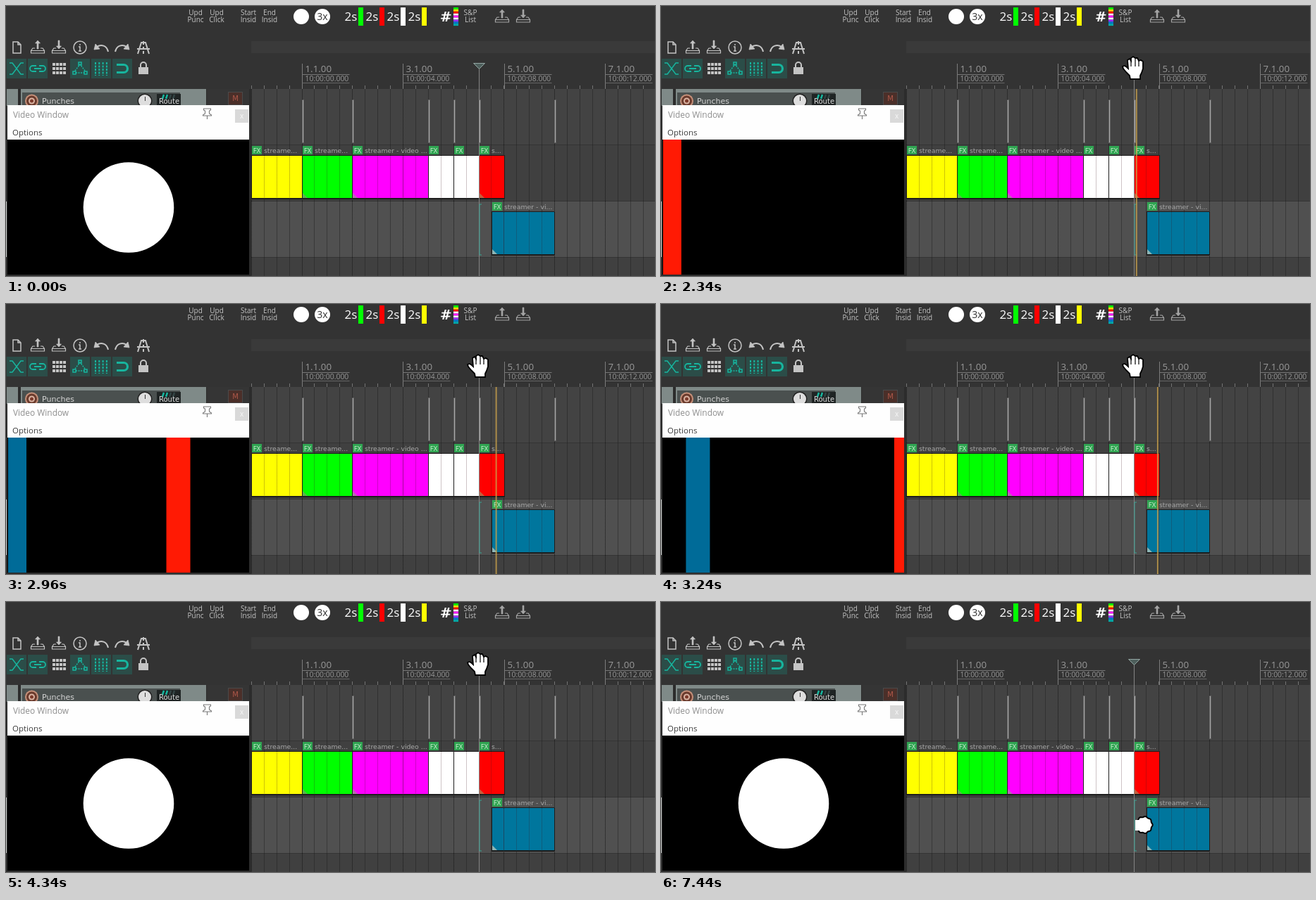
Write an HTML page with a canvas that moves like this. It is 921 px wide and 384 px high and loops after 8 s.

```html
<!DOCTYPE html>
<html lang="en">
<head>
<meta charset="utf-8">
<style>
html, body { margin: 0; width: 100%; height: 100%; overflow: hidden; background: #333; }
canvas { display: block; }
</style>
</head>
<body>
<canvas id="stage" width="921" height="384"></canvas>
<script>
const LOOP = 8000, STEP = 69, PLAY = 2270, STOP = 4340;
const BEAT = 17.93, BAR_X = 420.5, EDIT_X = 671.5;
const SANS = '"Open Sans", sans-serif', WIDE = '"DejaVu Sans", sans-serif';
const TEAL = '#17b59e', PALE = '#c4c4c4';
const stage = document.getElementById('stage');
const still = document.createElement('canvas');
still.width = 921;
still.height = 384;
let c = still.getContext('2d');

function rect(x, y, w, h, color) {
  c.fillStyle = color;
  c.fillRect(x, y, w, h);
}

function disc(x, y, r, color) {
  c.fillStyle = color;
  c.beginPath();
  c.arc(x, y, r, 0, 7);
  c.fill();
}

function text(s, x, y, size, color, font = SANS, align = 'left') {
  c.font = size + 'px ' + font;
  c.fillStyle = color;
  c.textAlign = align;
  c.fillText(s, x, y);
}

function line(x1, y1, x2, y2, color, dash = [], width = 1) {
  c.strokeStyle = color;
  c.lineWidth = width;
  c.setLineDash(dash);
  c.beginPath();
  c.moveTo(x1, y1);
  c.lineTo(x2, y2);
  c.stroke();
  c.setLineDash([]);
}

// Strokes (and optionally fills) an SVG path placed at x, y.
function icon(d, x, y, color, width = 1.5, fill) {
  const path = new Path2D(d);
  c.save();
  c.translate(x, y);
  if (fill) {
    c.fillStyle = fill;
    c.fill(path);
  }
  c.strokeStyle = color;
  c.lineWidth = width;
  c.stroke(path);
  c.restore();
}

function drive(x, y, up, color) {
  icon('M-4 2H-7L-9.5 5.5V9H9.5V5.5L7 2H4M-9.5 5.5H9.5', x, y, color, 1.2);
  icon(up ? 'M0 -9L3.5 -5H1V3H-1V-5H-3.5Z' : 'M0 3L3.5 -1H1V-9H-1V-1H-3.5Z', x, y, color, .6, color);
}

// side is 1 for an arrow to the left, -1 for its mirror image.
function turnArrow(x, y, side) {
  c.save();
  c.translate(x, y);
  c.scale(side, 1);
  icon('M10 6C8 -3 0 -5 -6 -1', 0, 0, PALE, 2);
  icon('M-10 3L-8 -5L-2 2Z', 0, 0, PALE, .8, PALE);
  c.restore();
}

function drawToolbar() {
  [['Upd', 'Punc', 269], ['Upd', 'Click', 299], ['Start', 'Insid', 344], ['End', 'Insid', 374], ['S&P', 'List', 659]]
    .forEach(([a, b, x]) => {
      text(a, x, 13, 10, PALE, SANS, 'center');
      text(b, x, 23, 10, PALE, SANS, 'center');
    });
  disc(419, 15, 11, '#fff');
  disc(449, 15, 11, '#fff');
  text('3x', 449, 20, 14, '#333', SANS, 'center');
  ['#0f0', '#f00', '#fff', '#ff0'].forEach((color, i) => {
    text('2s', 480.5 + i * 30, 21, 17, '#fff');
    rect(500 + i * 30, 2, 7, 26, color);
  });
  text('#', 624, 22, 20, '#fff', WIDE, 'center');
  text('#', 624.7, 22, 20, '#fff', WIDE, 'center');
  ['#0f0', '#fd0', '#f00', '#fff', '#f0f', '#fff', '#93f', '#07c', '#0aa']
    .forEach((color, i) => rect(635, 2 + i * 2.9, 7, 2.9, color));
  drive(704, 14, true, '#a5a5a5');
  drive(734, 14, false, '#a5a5a5');
}

function drawIcons() {
  icon('M-5 -8H2L6 -4V8H-5ZM2 -8V-4H6', 15, 59, PALE);
  drive(45, 58, true, PALE);
  drive(75, 58, false, PALE);
  icon('M9 0A9 9 0 1 1 -9 0A9 9 0 1 1 9 0M-2 -1H0V5M-2 5H2M0 -5V-3', 105, 59, PALE);
  turnArrow(135, 59, 1);
  turnArrow(165, 59, -1);
  icon('M-8 9L-3 -7H3L8 9M-9 2H9M0 -9V-4M0 -1V2M0 5V9', 195, 59, PALE, 2);
  [1, 31, 91, 121, 151].forEach(x => rect(x, 75, 28, 28, '#2b4d48'));
  icon('M-10 -8H-6L6 8H10M-10 8H-6L6 -8H10', 15, 89, TEAL);
  icon('M-2 -4H-7A4 4 0 0 0 -7 4H-2M2 -4H7A4 4 0 0 1 7 4H2M-5 0H5', 45, 89, TEAL, 1.8);
  for (let i = 0; i < 12; i++) rect(66 + i % 4 * 5, 81 + (i >> 2) * 6, 4, 4, PALE);
  c.setLineDash([2, 1.5]);
  icon('M-7 3L0 -6L7 3M-6 6H6', 105, 89, TEAL);
  c.setLineDash([]);
  icon('M-10 4H-6V8H-10ZM-2 -9H2V-5H-2ZM6 4H10V8H6Z', 105, 89, TEAL);
  for (let i = 0; i < 4; i++) line(127 + i * 5.3, 80, 127 + i * 5.3, 99, TEAL, [3, 1.5], 2);
  icon('M-8 -5.5H2A5.5 5.5 0 0 1 2 5.5H-8', 165, 89, TEAL, 3.2);
  icon('M-4 -1V-4A4 4 0 0 1 4 -4V-1', 195, 88, PALE, 2);
  rect(188, 87, 14, 10, PALE);
}

function drawTrackPanel() {
  rect(0, 118, 348, 266, '#2c2c2c');
  rect(1, 118, 16, 24, '#7f8a88');
  rect(21, 118, 263, 24, '#7f8a88');
  rect(23, 123, 224, 19, '#4a504f');
  rect(285, 118, 60, 24, '#353535');
  disc(36.5, 135, 9.5, '#c5907a');
  disc(36.5, 135, 7.5, '#6a3a2c');
  disc(36.5, 135, 4.5, '#d9b3a2');
  disc(36.5, 135, 2.5, '#7c3b2c');
  text('Punches', 51, 139, 11, '#d4d4d4', WIDE);
  disc(197, 135, 10.5, '#222');
  disc(197, 135, 9, '#dedede');
  line(197.5, 129, 197.5, 135, '#333');
  rect(214, 125, 34, 17, '#1f2424');
  for (let i = 0; i < 4; i++) icon('M2 0L0 6', 222 + i * 5, 126, i < 2 ? TEAL : '#344', 2.5);
  text('Route', 217, 139, 10, '#ddd', WIDE);
  rect(315, 122, 21, 19, '#4a4a4a');
  rect(316, 123, 19, 17, '#4b2f29');
  text('M', 325.5, 135, 10, '#b0584a', WIDE, 'center');
  rect(0, 278, 1, 79, '#c9cccb');
}

function drawVideoWindow() {
  rect(2, 141, 343, 49, '#fefefe');
  text('Video Window', 10, 159, 11.9, '#8e8e8e');
  text('Options', 9, 184, 11.5, '#3c3c3c');
  icon('M-5 -7H5V-5L3 -4V0L6 2V3H-6V2L-3 0V-4L-5 -5ZM0 3V8', 285.5, 153, '#777', 1.1);
  rect(325, 147, 19, 19, '#d9d9d9');
  text('x', 334.5, 160, 10, '#f8f8f8', SANS, 'center');
  rect(2, 190, 343, 192, '#000');
}

function drawRuler() {
  rect(348, 50, 573, 17, '#3a3a3a');
  for (let i = -4; i < 28; i++) {
    const x = Math.round(BAR_X + i * BEAT) - .5;
    line(x, 113, x, 118, '#737373');
  }
  for (let i = 0; i < 4; i++) {
    const x = Math.round(420 + i * 143.4) + .5;
    line(x, 82, x, 118, '#7c7c7c');
    line(x, 97.5, x + 67, 97.5, '#777');
    line(x, 109.5, x + 67, 109.5, '#666');
    text(1 + i * 2 + '.1.00', x + 4, 94, 13.3, '#999');
    text('10:00:' + String(i * 4).padStart(2, '0') + '.000', x + 4, 107, 10.4, '#969696');
  }
}

function drawGrid() {
  for (let i = -4; i < 28; i++) {
    const x = Math.round(BAR_X + i * BEAT) - .5;
    if (i % 4) line(x, 118, x, 384, 'rgba(30,30,30,.45)');
    else line(x, 118, x, 384, '#161616', [1, 1]);
  }
}

function drawItem(x, end, y, color, label, fade) {
  rect(x, y, end - x, 63, '#1d1d1d');
  rect(x + 1, y + 1, end - x - 2, 60, color);
  for (let i = -4; i < 28; i++) {
    const gx = Math.round(BAR_X + i * BEAT) - .5;
    if (gx > x + 2 && gx < end - 2) line(gx, y + 1, gx, y + 61, `rgba(60,20,30,${i % 4 ? .5 : .9})`, [1, 1]);
  }
  if (fade) {
    c.fillStyle = fade;
    c.beginPath();
    c.moveTo(x + 1, y + 54);
    c.lineTo(x + 8, y + 61);
    c.lineTo(x + 1, y + 61);
    c.fill();
  }
  rect(x + 1, y - 13, 14, 12, '#2fa451');
  text('FX', x + 8, y - 3.5, 9.5, '#d5f0d8', SANS, 'center');
  text(label, x + 18, y - 3, 9.3, '#a8a8a8', WIDE);
}

function drawArrange() {
  rect(348, 118, 573, 79, '#434343');
  rect(348, 198, 573, 79, '#404040');
  rect(348, 278, 573, 79, '#505050');
  rect(348, 358, 573, 26, '#404040');
  [197, 277, 357].forEach(y => rect(348, y, 573, 1, '#343434'));
  drawGrid();
  [420, 491, 599, 635, 671, 778].forEach(x => {
    rect(x, 133, 3, 62, '#5f5f5f');
    rect(x + 1, 134, 1, 60, '#a8a8a8');
  });
  drawItem(348, 421, 212, '#ff0', 'streame...');
  drawItem(420, 492, 212, '#0f0', 'streame...', '#58b64b');
  drawItem(491, 600, 212, '#f0f', 'streamer - video ...', '#b66ab0');
  drawItem(599, 636, 212, '#fff', '');
  drawItem(635, 672, 212, '#fff', '');
  drawItem(671, 708, 212, '#f00', 's...', '#c4603f');
  drawItem(689, 779, 292, '#00769d', 'streamer - vi...', '#8eb5b5');
  line(EDIT_X, 89, EDIT_X, 384, '#858585');
  icon('M-8 0H8L0 8Z', 671.5, 81.5, '#93a6a3', 1, '#4e5f5c');
  icon('M4 0H1V72H4', 671, 282, '#3aa394', 1);
}

const HAND = 'M8 17L7 5L10 3L12 6V2L15 0L18 2L21 2L23 6L26 5L29 7V17L27 23L25 27V32H11L10 27L5 22L1 17L0 14L3 13L6 15Z';
function drawHand(x, y) {
  icon(HAND, x, y, '#000', 1.8, '#fff');
  icon('M12 5V14M18 3V14M23 6V14', x, y, '#000', 1.2);
}

function drawFist(x, y) {
  c.save();
  c.beginPath();
  c.rect(673, 300, 40, 40);
  c.clip();
  c.beginPath();
  for (let a = 0; a < 6.28; a += .1) {
    const r = 11.6 + .6 * Math.cos(a * 9);
    c.lineTo(x + r * Math.cos(a), y + r * Math.sin(a));
  }
  c.closePath();
  c.fillStyle = '#fff';
  c.fill();
  c.strokeStyle = '#000';
  c.lineWidth = 2;
  c.stroke();
  rect(673, 310, 6, 15, '#fff');
  c.restore();
}

function drawBeam([x, y]) {
  const d = 'M-9 -15.5H-3L0 -13L3 -15.5H9M-9 15.5H-3L0 13L3 15.5H9M0 -14V14';
  icon(d, x, y, 'rgba(45,45,45,.7)', 4.5);
  icon(d, x, y, '#cfcfcf', 2.8);
}

// Position along [time, x, y] keys.
function along(keys, t) {
  let i = 0;
  while (i < keys.length - 2 && t > keys[i + 1][0]) i++;
  const [a, b] = [keys[i], keys[i + 1]];
  const p = Math.min(1, (t - a[0]) / (b[0] - a[0]));
  return [a[1] + (b[1] - a[1]) * p, a[2] + (b[2] - a[2]) * p];
}

const ENTER = [[500, 850, 372], [800, 775, 250], [1050, 708, 148], [1250, 683, 115]];
const LEAVE = [[5380, 673, 91], [5520, 695, 155], [5660, 719, 225], [5800, 736, 285], [5930, 730, 345],
  [6020, 721, 350], [6140, 702, 327], [6220, 696, 323], [6400, 685, 319]];

function drawPointer(t) {
  const snap = start => start + Math.floor((t - start) / STEP) * 69.5;
  if (t < 500) return;
  if (t < 1350) drawBeam(along(ENTER, snap(500)));
  else if (t < 1390) drawHand(659, 80);
  else if (t < 4920) drawHand(655, 72);
  else if (t >= 5380 && t < 6540) drawBeam(along(LEAVE, t < 6220 ? snap(5380) : t));
  else if (t >= 7440) drawFist(685.5, 317);
  else if (t >= 6540) drawHand(675, 302);
  if (t >= 1750 && t < 1810) icon('M23 0A23 23 0 1 1 -23 0A23 23 0 1 1 23 0', 669, 87, '#e8e8e8', 1.5);
}

function drawPlayback(t) {
  if (t < PLAY || t >= STOP) {
    disc(174, 286.5, 64.3, '#fff');
    return;
  }
  const at = Math.floor((t - PLAY) / STEP) * 69.5;
  c.save();
  c.beginPath();
  c.rect(3, 190, 342, 192);
  c.clip();
  rect(-31 + .372 * at, 190, 34, 192, '#ff1a04');
  rect(-5 + .1453 * (at - 695), 190, 34, 192, '#006b98');
  c.restore();
  rect(671.5 + .0333 * at, 118, 2, 266, 'rgba(200,160,75,.78)');
}

function draw() {
  const t = performance.now() % LOOP;
  c.drawImage(still, 0, 0);
  drawPlayback(t);
  drawPointer(t);
  requestAnimationFrame(draw);
}

rect(0, 0, 921, 384, '#333');
drawToolbar();
drawIcons();
drawTrackPanel();
drawRuler();
drawArrange();
drawVideoWindow();
c = stage.getContext('2d');
draw();
</script>
</body>
</html>
```
